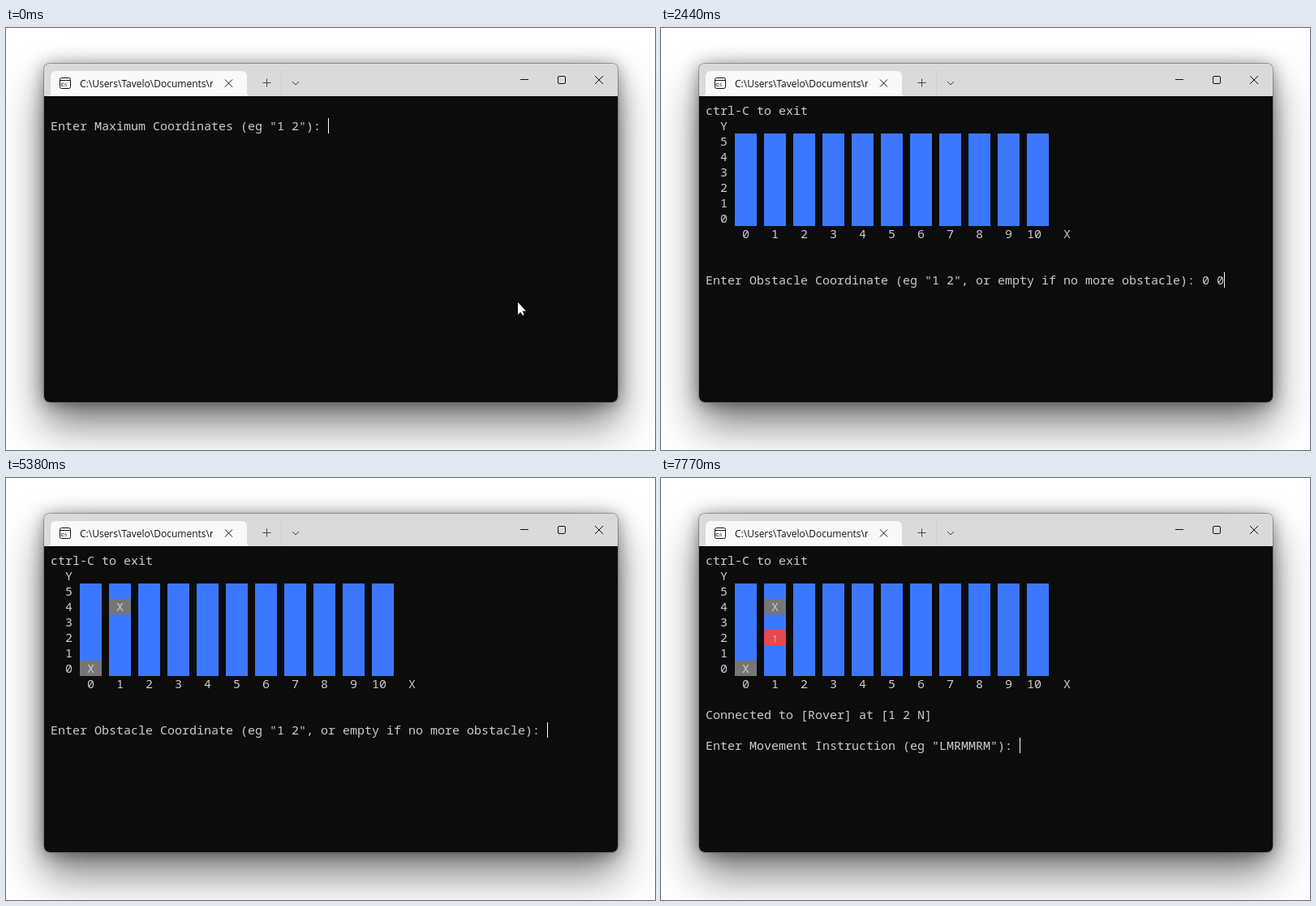
An HTML page that plays this animation: 800 px wide and 520 px high, repeating every 8 s.

```html
<!DOCTYPE html>
<html lang="en">
<head>
<meta charset="utf-8">
<title>Rover console</title>
<style>
  html, body { margin: 0; width: 100%; height: 100%; overflow: hidden; background: #fff; }
  #window {
    position: absolute; left: 47px; top: 44px; width: 707px; height: 417px; border-radius: 7px;
    box-shadow: 0 0 0 1px rgba(90, 90, 90, .5), 0 2px 21px rgba(0, 0, 0, .45), 0 28px 52px rgba(0, 0, 0, .5);
    background: linear-gradient(#dadada 40px, #0c0c0c 40px);
  }
  svg { position: absolute; left: 0; top: 0; }
  .line { fill: none; stroke: #111; }
  .title { font: 12px "Open Sans", sans-serif; fill: #111; }
  .icon { font: bold 5.5px "Liberation Sans", sans-serif; fill: #111; }
  #screen { font: 500 15px "Noto Sans Mono", monospace; fill: #ccc; }
  #screen text { white-space: pre; }
</style>
</head>
<body>
<div id="window"></div>
<svg width="800" height="520" viewBox="0 0 800 520">
  <clipPath id="titleClip"><rect x="91" y="55" width="164" height="28"/></clipPath>
  <path fill="#f9f9f9" d="M51 84q4 0 4-4V60q0-7 7-7h228q7 0 7 7v20q0 4 4 4z"/>
  <g class="line">
    <rect x="66.5" y="61.5" width="13" height="13" rx="2"/>
    <path d="M66.5 64.5h13"/>
    <path d="M270 63.5l9 9m0-9l-9 9"/>
    <path stroke="#444" d="M316.5 67.5h10m-5-5v10M353 66l4 4 4-4"/>
    <path stroke="#cecece" d="M339.5 52v32"/>
    <path d="M634 63.5h10M726 59l10 10m0-10l-10 10"/>
    <rect x="680.5" y="59.5" width="9" height="9" rx="1.5"/>
  </g>
  <text class="icon" x="67.5" y="72">C:\</text>
  <text class="title" x="91" y="73" clip-path="url(#titleClip)">C:\Users\Tavelo\Documents\r</text>
  <g id="screen"></g>
  <path id="pointer" fill="#fff" d="M631 338v15l3.5-3 2.1 4 2-.8-2-4.5h4.4z"/>
</svg>
<script>
const LOOP = 8000, LEFT = 55, TOP = 92, CELL = 9, ROW = 19;
const GREY = '#767676', RED = '#e74856', BLUE = '#3b78ff';
const screen = document.getElementById('screen');
const pointer = document.getElementById('pointer');

// Each prompt maps rows to text; typing continues on its last row.
const prompts = {
  size: { 1: 'Enter Maximum Coordinates (eg "1 2"): ' },
  obstacle: { 11: 'Enter Obstacle Coordinate (eg "1 2", or empty if no more obstacle): ' },
  vehicle: {
    11: 'Enter Position (eg "1 2 N") to add new Vehicle, or',
    12: 'Enter Coordinates (eg "1 2") to connect with existing vehicle: '
  },
  move: {
    10: 'Connected to [Rover] at [1 2 N]',
    12: 'Enter Movement Instruction (eg "LMRMMRM"): '
  }
};

// Map markers with the time they appear: x, y, symbol, colour.
const markers = [
  [2780, 0, 0, 'X', GREY],
  [4280, 1, 4, 'X', GREY],
  [7770, 1, 2, '↑', RED]
];

// Start time, prompt, typed text, cursor: on, off or next (start of the next row).
const steps = [
  [0, 'size', '', 'on'], [40, 'size', '', 'off'],
  [470, 'size', '1', 'on'], [570, 'size', '10', 'on'],
  [800, 'size', '10 ', 'on'], [1000, 'size', '10 5', 'on'], [1300, 'size', '10 5', 'next'],
  [1330, 'obstacle', '', 'on'], [1910, 'obstacle', '', 'off'],
  [2170, 'obstacle', '0', 'on'], [2290, 'obstacle', '0 ', 'on'],
  [2440, 'obstacle', '0 0', 'on'], [2750, 'obstacle', '0 0', 'next'],
  [2780, 'obstacle', '', 'on'], [3370, 'obstacle', '', 'off'],
  [3480, 'obstacle', '1', 'on'], [3810, 'obstacle', '1 ', 'on'], [3970, 'obstacle', '1 4', 'on'],
  [4280, 'obstacle', '', 'on'], [4850, 'obstacle', '', 'off'], [5380, 'obstacle', '', 'on'],
  [5430, 'vehicle', '', 'on'], [6020, 'vehicle', '', 'off'],
  [6470, 'vehicle', '1', 'on'], [6640, 'vehicle', '1 ', 'on'], [6870, 'vehicle', '1 2', 'on'],
  [6940, 'vehicle', '1 2 ', 'on'], [7250, 'vehicle', '1 2 N', 'on'],
  [7770, 'move', '', 'on']
];

function add(tag, attributes, content = '') {
  const node = document.createElementNS('http://www.w3.org/2000/svg', tag);
  for (const name in attributes) node.setAttribute(name, attributes[name]);
  node.textContent = content;
  screen.append(node);
}

const write = (col, row, content) =>
  add('text', { x: LEFT + col * CELL, y: TOP + row * ROW + 15 }, content);

const block = (col, row, width, height, fill) =>
  add('rect', { x: LEFT + col * CELL, y: TOP + row * ROW, width, height, fill });

function drawMap(time) {
  write(0, 0, 'ctrl-C to exit');
  write(2, 1, 'Y');
  for (let y = 0; y <= 5; y++) write(2, 7 - y, y);
  for (let x = 0; x <= 10; x++) {
    block(4 + 4 * x, 2, 3 * CELL, 6 * ROW, BLUE);
    write(x < 10 ? 5 + 4 * x : 44, 8, x);
  }
  write(49, 8, 'X');
  for (const [start, x, y, symbol, color] of markers) {
    if (time < start) continue;
    block(4 + 4 * x, 7 - y, 3 * CELL, ROW, color);
    write(5 + 4 * x, 7 - y, symbol);
  }
}

function drawStep([time, name, typed, cursor]) {
  screen.replaceChildren();
  pointer.style.display = time < 470 ? '' : 'none';
  if (name !== 'size') drawMap(time);

  const lines = Object.entries(prompts[name]);
  for (const [row, content] of lines) write(0, +row, content);

  const [lastRow, lastLine] = lines[lines.length - 1];
  const row = +lastRow, col = lastLine.length;
  write(col, row, typed);
  if (cursor === 'on') block(col + typed.length, row, 1, ROW, '#fff');
  if (cursor === 'next') block(0, row + 1, 1, ROW, '#fff');
}

let shown;
function frame() {
  const time = performance.now() % LOOP;
  const step = steps.findLast(([start]) => start <= time);
  if (step !== shown) drawStep(shown = step);
  requestAnimationFrame(frame);
}
frame();
</script>
</body>
</html>
```
